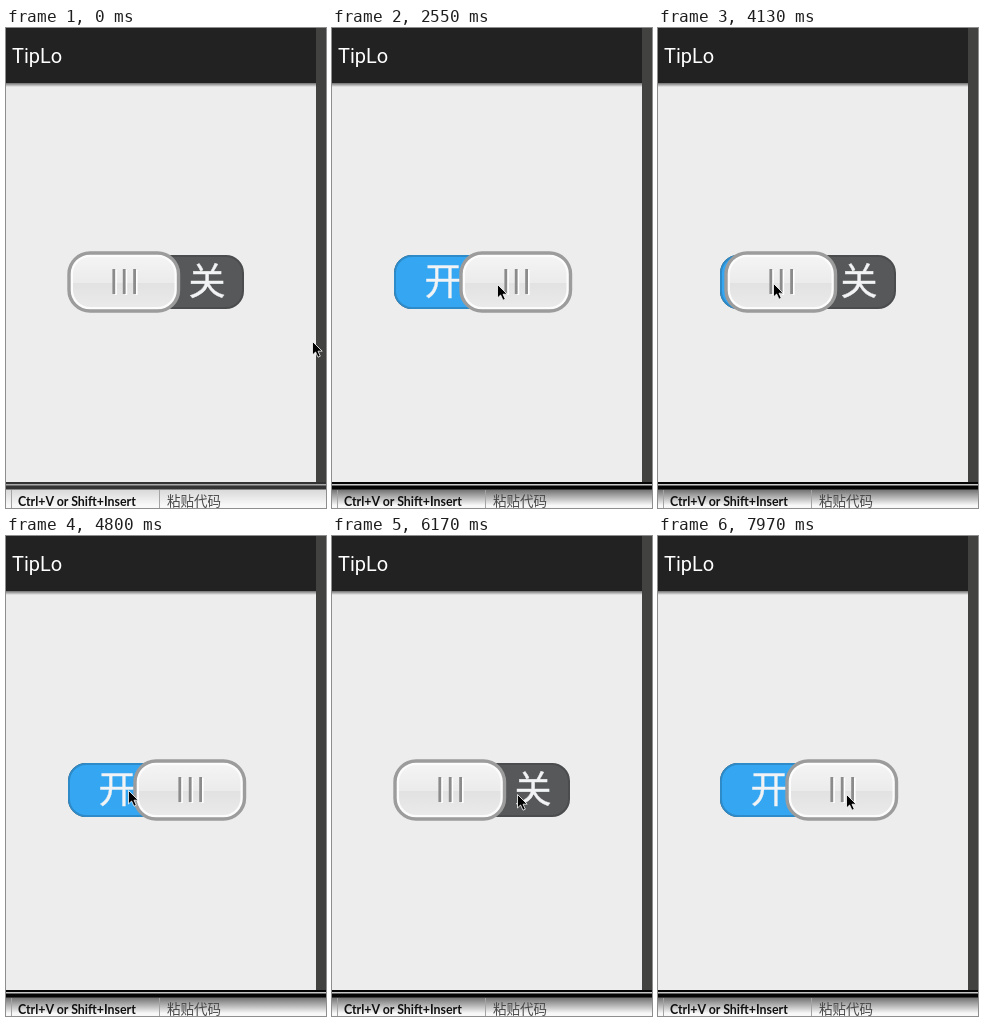
Animation of 320x480 px, one loop 8000 ms. Source, as an HTML page:

```html
<!DOCTYPE html>
<html lang="zh">
<meta charset="utf-8">
<title>Switch</title>
<style>
html, body { margin: 0; width: 100%; height: 100%; overflow: hidden; background: #ededed; }
svg { display: block; width: 320px; height: 480px; }
.cjk { font-family: "Noto Sans CJK SC", "Noto Sans CJK", sans-serif; }
.label { font-size: 37px; fill: #f1f3f4; stroke: #f1f3f4; stroke-width: .4px; text-anchor: middle; }
.track { width: 174px; height: 52px; stroke-width: 2px; }
#frame { --edge: #333; --line: #a8a8a8; --shade: #d8d8d8; }
#frame.focused { --edge: #050505; --line: #c8c8c8; --shade: #707070; }
.edge { fill: var(--edge); }
.line { fill: var(--line); }
</style>
<svg viewBox="0 0 320 480">
  <defs>
    <linearGradient id="bar" x2="0" y2="1">
      <stop stop-color="#707070"/><stop offset="1" stop-color="#ededed"/>
    </linearGradient>
    <linearGradient id="face" x2="0" y2="1">
      <stop stop-color="#f4f4f4"/><stop offset=".53" stop-color="#ebebeb"/>
      <stop offset=".53" stop-color="#e2e2e2"/><stop offset="1" stop-color="#eaeaea"/>
    </linearGradient>
    <clipPath id="left"><rect id="split" y="220" height="70"/></clipPath>
  </defs>

  <rect width="320" height="480" fill="#ededed"/>
  <rect width="310" height="55" fill="#222"/>
  <rect y="55" width="310" height="4" fill="url(#bar)"/>
  <text x="6" y="35" font-family="Roboto, sans-serif" font-size="20" fill="#fff">TipLo</text>
  <rect x="310" width="10" height="455" fill="#424240"/>

  <g id="frame">
    <linearGradient id="fade" x2="0" y2="1">
      <stop style="stop-color: var(--shade)"/><stop offset=".85" stop-color="#f8f8f8"/>
    </linearGradient>
    <rect class="edge" y="454" width="320" height="8"/>
    <rect class="line" y="456" width="320" height="1.5"/>
    <rect y="461.5" width="320" height="18.5" fill="url(#fade)"/>
  </g>
  <path d="M5.5 462v18M153.5 462v18" stroke="#a4a4a4"/>
  <text x="12" y="478" font-family="Lato, sans-serif" font-weight="700" font-size="12.4" fill="#111">Ctrl+V or Shift+Insert</text>
  <text class="cjk" x="161" y="477.5" font-size="13.5" fill="#484848">粘贴代码</text>

  <rect class="track" x="63" y="228" rx="17" fill="#565859" stroke="#4a4c4d"/>
  <rect class="track" x="63" y="228" rx="17" fill="#35a6f2" stroke="#2d8bc9" clip-path="url(#left)"/>
  <text class="cjk label" x="111" y="267">开</text>
  <text class="cjk label" x="201" y="267">关</text>

  <g id="thumb">
    <rect x="63" y="225" width="109.5" height="58" rx="21" fill="#fcfcfc" stroke="#9c9c9c" stroke-width="3.4"/>
    <rect x="67" y="229" width="101.5" height="50" rx="17" fill="url(#face)"/>
    <path d="M109.8 242v25m10.4-25v25m10.4-25v25" stroke="#fff" stroke-width="2"/>
    <path d="M107.8 241v25m10.4-25v25m10.4-25v25" stroke="#8b8b8b" stroke-width="2.8"/>
  </g>
  <path id="cursor" d="M.5.5V14L3.6 11 6 16.2 8.3 15.2 6 10.2H10.2Z" stroke="#fff" stroke-width=".8"/>
</svg>
<script>
const $ = id => document.getElementById(id);
const LOOP = 8000, FOCUS = 1600, TICK = 120, ON = 66;
const START = { x: 306, y: 313 };

// the pointer hops once per tick towards x, y; a drag takes the thumb along
const moves = [
  { from: 130, to: 1030, x: 206, y: 281 },
  { from: 1180, to: 1330, x: 205, y: 258 },
  { from: 2150, to: 2280, x: 154, y: 256 },
  { from: 2550, to: 2550, x: 165, y: 256 },
  { from: 2820, to: 3090, x: 100, y: 256 },
  { from: 3770, to: 3890, x: 110, y: 255 },
  { from: 4010, to: 4400, x: 122, y: 254, drag: true },
  { from: 4930, to: 5200, x: 197, y: 258 },
  { from: 5340, to: 5610, x: 185, y: 258, drag: true },
  { from: 6300, to: 6570, x: 132, y: 258 },
  { from: 6710, to: 6980, x: 161, y: 258, drag: true },
  { from: 7820, to: 7970, x: 188, y: 258 }
];
const clicks = [1750, 3370, 4800, 6170, 7540];

function pose(t) {
  const done = clicks.filter(c => c <= t);
  const lastClick = done.at(-1) ?? 0;
  let { x, y } = START, offset = done.length % 2 * ON;
  for (const m of moves.filter(m => m.from <= t)) {
    const hops = Math.floor((m.to - m.from) / TICK) + 1;
    const hop = Math.floor((t - m.from) / TICK) + 1;
    const k = Math.min(1, hop / hops) ** 1.3;
    const dx = Math.round((m.x - x) * k);
    if (m.drag && m.from > lastClick) offset += dx;
    x += dx;
    y += Math.round((m.y - y) * k);
  }
  return { x, y, offset };
}

const move = (id, x, y) => $(id).setAttribute("transform", `translate(${x} ${y})`);

function draw(now) {
  const t = now % LOOP;
  const { x, y, offset } = pose(t);
  move("cursor", x, y);
  move("thumb", offset, 0);
  $("split").setAttribute("width", 118 + offset);
  $("frame").classList.toggle("focused", t >= FOCUS);
  requestAnimationFrame(draw);
}
draw(0);
</script>
</html>
```
